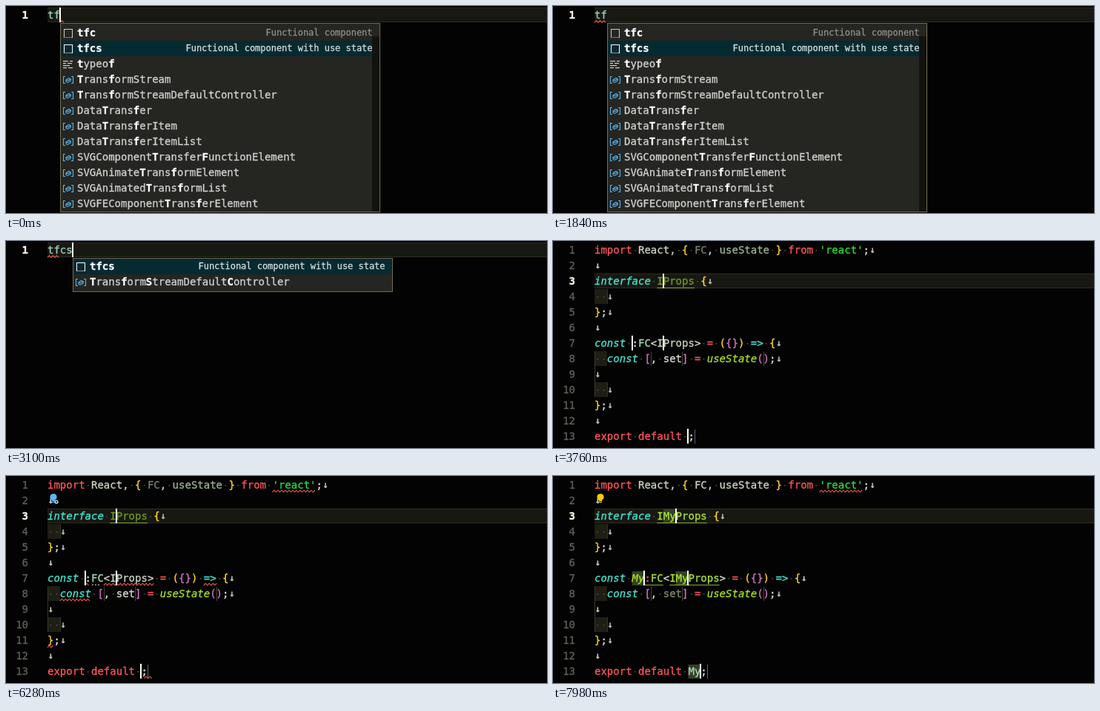
An HTML page with a canvas for the animation above (8000 ms loop, 730 by 280 pixels).

```html
<!DOCTYPE html>
<html lang="en">
<head>
<meta charset="utf-8">
<title>Snippet completion</title>
<style>
html, body { margin: 0; width: 100%; height: 100%; overflow: hidden; background: #030303; }
canvas { display: block; }
</style>
</head>
<body>
<canvas id="stage" width="730" height="280"></canvas>
<script>
const ctx = document.getElementById('stage').getContext('2d');
const LOOP = 8000, CHAR = 8.43, ROW = 21, LEFT = 56;
const FONT = '"DejaVu Sans Mono", monospace';

// Key presses and editor reactions, in ms
const AT = {
  lint: 420, c: 2060, s: 2720, expand: 3340, check: 4240,
  fix: 5400, m: 6700, y: 6920, bulb: 7300, clean: 7600
};

const C = {
  red: '#ff565a', pale: '#c9d3c4', green: '#a8d8b4', dim: '#74836c', gold: '#ffd52a',
  lime: '#a9e336', mute: '#6f9424', str: '#2adc34', teal: '#44e8d2', pink: '#d673c0',
  fn: '#a6e022', plain: '#dcdcd2', arrow: '#c8c8bc', space: '#52524a'
};

const cell = n => LEFT + n * CHAR;
const mid = line => 12 + (line - 1) * ROW;

function rect(x, y, w, h, color) {
  ctx.fillStyle = color;
  ctx.fillRect(x, y, w, h);
}

function frame(x, y, w, h, color) {
  ctx.strokeStyle = color;
  ctx.lineWidth = 1;
  ctx.strokeRect(x + .5, y + .5, w - 1, h - 1);
}

// Monospaced text on a fixed grid, thickened slightly
function type(text, x, base, color, style = '', size = 14, step = CHAR) {
  ctx.font = `${style} ${size}px ${FONT}`;
  ctx.fillStyle = ctx.strokeStyle = color;
  ctx.lineWidth = .3;
  [...text].forEach((ch, i) => {
    ctx.fillText(ch, x + i * step, base);
    ctx.strokeText(ch, x + i * step, base);
  });
}

function squiggle(x, y, w, color = '#ff5c4c') {
  ctx.strokeStyle = color;
  ctx.lineWidth = 1.1;
  ctx.beginPath();
  for (let d = 0; d <= w; d += 2.5) ctx.lineTo(x + d, y + (d / 2.5 % 2 ? -1.3 : 1.3));
  ctx.stroke();
}

function caret(line, col) {
  rect(Math.round(cell(col)) - 1, mid(line) - 10, 2, 20, '#fffff0');
}

function activeLine(line) {
  const y = mid(line) - 10;
  rect(LEFT, y, 674, 20, '#181812');
  rect(LEFT, y, 674, 1, '#2c2c24');
  rect(LEFT, y + 19, 674, 1, '#2c2c24');
}

function lineNumber(n, active) {
  const s = String(n);
  type(s, 30 - s.length * CHAR, mid(n) + 5, active ? '#fffff0' : '#62625a', active ? 'bold' : '');
}

// Each token is [text, color, style]
function codeLine(n, tokens, newline = true) {
  let col = 0;
  for (const [text, color, style] of tokens) {
    type(text, cell(col), mid(n) + 5, color, style);
    [...text].forEach((ch, i) => {
      if (ch === ' ') rect(cell(col + i) + 3.4, mid(n), 1.6, 1.6, C.space);
    });
    col += text.length;
  }
  if (newline) type('↓', cell(col) + .7, mid(n) + 4, C.arrow, 'bold', 12);
}

/* Completion list */

function snippetIcon(x, y, color) {
  frame(x, y - 5, 12, 12, color);
  for (let i = 1; i < 11; i += 2) rect(x + i, y + 6, 1, 1, '#20201c');
}

function keywordIcon(x, y) {
  [[0, -4, 7], [9, -4, 4], [0, -1, 4], [6, -1, 6], [0, 2, 9], [0, 5, 5], [7, 5, 6]]
    .forEach(([dx, dy, w]) => rect(x - 1 + dx, y + dy, w, 1.2, '#d0d0cc'));
}

function variableIcon(x, y) {
  ctx.strokeStyle = '#58b4ea';
  ctx.lineWidth = 1.1;
  ctx.beginPath();
  for (const [edge, dir] of [[x - .5, 1], [x + 12.5, -1]]) {
    ctx.moveTo(edge + dir * 2.5, y - 3.5);
    ctx.lineTo(edge, y - 3.5);
    ctx.lineTo(edge, y + 5.5);
    ctx.lineTo(edge + dir * 2.5, y + 5.5);
  }
  ctx.moveTo(x + 3, y + 1);
  ctx.lineTo(x + 7, y - 1.5);
  ctx.lineTo(x + 9.5, y);
  ctx.lineTo(x + 9, y + 2.5);
  ctx.lineTo(x + 5, y + 4.5);
  ctx.lineTo(x + 3, y + 3.5);
  ctx.closePath();
  ctx.moveTo(x + 3, y + 1);
  ctx.lineTo(x + 5.5, y + 2);
  ctx.lineTo(x + 9.5, y);
  ctx.stroke();
}

// An underscore makes the next letter a highlighted match
function label(text, x, y, selected) {
  let col = 0, bold = false;
  for (const ch of text) {
    if (ch === '_') { bold = true; continue; }
    const color = selected || bold ? '#ffffff' : '#d0d0d0';
    type(ch, x + col++ * CHAR, y + 5, color, bold ? 'bold' : '');
    bold = false;
  }
}

const ONE = 'Functional component', TWO = ONE + ' with use state';
const LISTS = {
  tf: { pick: 1, first: 36, height: 256, scrolls: true, rows: [
    ['_t_f_c', ONE], ['_t_f_c_s', TWO], ['_typeo_f', 'key'], ['_Trans_formStream'],
    ['_Trans_formStreamDefaultController'], ['Data_Trans_fer'], ['Data_Trans_ferItem'],
    ['Data_Trans_ferItemList'], ['SVGComponent_Transfer_FunctionElement'],
    ['SVGAnimate_Trans_formElement'], ['SVGAnimated_Trans_formList'],
    ['SVGFEComponent_Trans_ferElement']] },
  tfc: { pick: 0, first: 34, height: 88, rows: [
    ['_t_f_c', ONE], ['_t_f_cs', TWO], ['_Trans_formStreamDefault_Controller'],
    ['SVGComponent_Transfer_Fun_ctionElement']] },
  tfcs: { pick: 0, first: 34, height: 46, rows: [
    ['_t_f_c_s', TWO], ['_Trans_form_StreamDefault_Controller']] }
};

function popup(word) {
  const { pick, first, height, scrolls, rows } = LISTS[word];
  const x = Math.round(cell(word.length));
  rect(x, 23, 432, height, '#252522');
  rect(x + 1, first + pick * ROW - 10, 430, ROW, '#042a32');
  if (scrolls) rect(x + 421, 41, 10, height - 19, '#12120f');
  frame(x, 23, 432, height, '#746a50');
  rows.forEach(([text, info], i) => {
    const y = first + i * ROW, on = i === pick;
    if (info === 'key') keywordIcon(x + 5, y);
    else if (info) {
      snippetIcon(x + 5, y, on ? '#ffffff' : '#d0d0c4');
      type(info, x + 421.5 - info.length * 7.2, y + 4, on ? '#d4dcdc' : '#8e8e88', '', 12, 7.2);
    } else variableIcon(x + 5, y);
    label(text, x + 23, y, on);
  });
}

function drawTyping(t) {
  const word = t < AT.c ? 'tf' : t < AT.s ? 'tfc' : 'tfcs';
  activeLine(1);
  lineNumber(1, true);
  type(word, LEFT, 17, '#98ccb8');
  if (t < AT.lint) squiggle(cell(2), 21, 5);
  else squiggle(LEFT, 21, 17);
  popup(word);
  const since = t < AT.c ? t + 150 : t - (t < AT.s ? AT.c : AT.s);
  if (since % 1000 < 500) caret(1, word.length);
}

/* Expanded snippet */

function bulb(blue) {
  ctx.fillStyle = blue ? '#62b4f2' : '#ffcc00';
  ctx.beginPath();
  ctx.arc(64, 28.5, 4.6, 0, Math.PI * 2);
  ctx.fill();
  rect(62, 32, 4, 4, ctx.fillStyle);
  rect(62, 34, 4, 1, '#332d08');
  if (blue) {
    ctx.fillStyle = '#b9dcf2';
    ctx.beginPath();
    ctx.arc(68, 35, 2.6, 0, Math.PI * 2);
    ctx.fill();
    rect(67, 34, 2, 2, '#12313f');
  }
}

function underline(line, col, n, color) {
  rect(cell(col), mid(line) + 9, n * CHAR, 1, color);
}

function drawSnippet(t) {
  const name = t < AT.m ? '' : t < AT.y ? 'M' : 'My';
  const n = name.length, clean = t >= AT.clean, checked = t >= AT.check;
  const used = clean ? C.pale : C.dim;
  const props = `I${name}Props`;

  activeLine(3);
  for (let i = 1; i <= 13; i++) lineNumber(i, i === 3);
  for (const line of [4, 8, 10]) rect(LEFT, mid(line) - 10, 17, 20, '#1e1e14');
  rect(LEFT, mid(8) - 10, 1, 62, '#3a3a28');
  rect(cell(2), mid(4) - 10, 1, 20, '#3a3a28');
  rect(cell(2), mid(10) - 10, 1, 20, '#3a3a28');

  // Linked name fields
  const fields = [[3, 11], [7, 6], [7, 11 + n], [13, 15]];
  for (const [line, col] of fields) {
    if (n) rect(cell(col), mid(line) - 9, n * CHAR, 19, '#344026');
  }
  // Remaining tab stops
  for (const [line, col] of [[8, 9], [8, 14], [8, 27], [13, 16 + n]]) {
    rect(Math.round(cell(col)), mid(line) - 9, 1, 19, line === 13 ? '#5c6668' : '#46463c');
  }

  codeLine(1, [['import ', C.red], ['React, ', C.pale], ['{ ', C.gold], ['FC', used], [', ', C.pale],
    ['useState ', clean ? C.pale : '#9db396'], ['} ', C.gold], ['from ', C.red], ["'react'", C.str], [';', C.plain]]);
  codeLine(2, []);
  codeLine(3, [['interface ', C.teal, 'italic'], [props, clean ? C.lime : C.mute], [' ', C.plain], ['{', C.gold]]);
  codeLine(4, [['  ', C.plain]]);
  codeLine(5, [['}', C.gold], [';', C.plain]]);
  codeLine(6, []);
  codeLine(7, [['const ', C.teal, 'italic'], [name, C.fn, 'italic'], [':', clean ? C.red : C.plain],
    ['FC', clean ? C.lime : C.green], ['<', C.plain], [props, clean ? C.lime : C.pale], ['> ', C.plain],
    ['= ', C.red], ['(', C.gold], ['{}', C.pink], [') ', C.gold], ['=> ', C.teal], ['{', C.gold]]);
  codeLine(8, [['  ', C.plain], ['const ', C.teal, 'italic'], ['[', C.pink], [', ', C.plain],
    ['set', clean ? '#7f8a70' : C.plain], ['] ', C.pink], ['= ', C.red], ['useState', C.fn, 'italic'],
    ['()', C.pink], [';', C.plain]]);
  codeLine(9, []);
  codeLine(10, [['  ', C.plain]]);
  codeLine(11, [['}', C.gold], [';', C.plain]]);
  codeLine(12, []);
  codeLine(13, [['export default ', C.red], [name, C.green], [';', C.plain]], false);

  underline(3, 10, 6 + n, '#8fae30');
  if (clean) {
    underline(7, 6 + n, 3, '#8fae30');
    underline(7, 10 + n, 6 + n, '#8fae30');
  }
  if (checked) {
    squiggle(cell(36), 20.5, 58);
    if (!clean) {
      const y7 = mid(7) + 8.5;
      squiggle(cell(6 + n), y7, 7);
      for (let i = 0; i < 3; i++) rect(cell(7 + n) + 1 + i * 4, y7, 2, 1.5, '#a4a498');
      squiggle(cell(9 + n), y7, 67.5 + n * CHAR);
      squiggle(cell(25 + 2 * n), y7, 17.5);
      squiggle(cell(2), mid(8) + 8.5, 42);
      squiggle(cell(0), mid(11) + 8.5, 8);
      squiggle(cell(15 + n) + 4, mid(13) + 8.5, 10);
    }
    if (t < AT.m || t >= AT.bulb) bulb(t >= AT.fix && t < AT.m);
  }

  const since = t < AT.m ? t - AT.expand + 70 : t < AT.y ? 0 : t - AT.y;
  if (since % 1000 < 500) for (const [line, col] of fields) caret(line, col + n);
}

function draw(now) {
  const t = now % LOOP;
  rect(0, 0, 730, 280, '#030303');
  if (t < AT.expand) drawTyping(t);
  else drawSnippet(t);
  requestAnimationFrame(draw);
}

draw(0);
</script>
</body>
</html>
```
